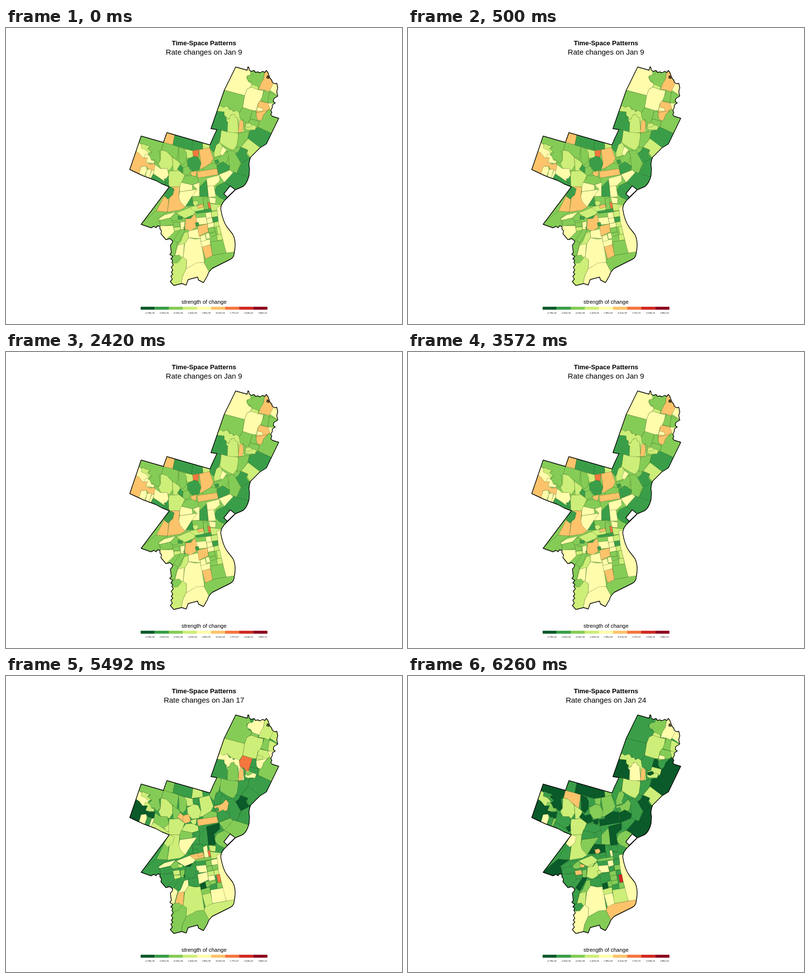
Recreate the animation shown at these times as an HTML page. Size 800 by 600 pixels, loop 8 s.

```html
<!DOCTYPE html>
<html lang="en">
<head>
<meta charset="utf-8">
<title>Time-Space Patterns</title>
<style>
html, body { margin: 0; width: 100%; height: 100%; overflow: hidden; background: #fff; }
svg { display: block; }
text { font-family: "Liberation Sans", Arial, sans-serif; text-anchor: middle; }
#areas path { stroke: #1c3a10; stroke-width: .3; }
.coast { fill: none; stroke: #000; stroke-width: 1.4; stroke-linejoin: round; }
</style>
</head>
<body>
<svg width="800" height="600" viewBox="0 0 800 600">
<clipPath id="clip"><path class="edge"/></clipPath>
<text x="400" y="35" font-size="13.2" font-weight="bold">Time-Space Patterns</text>
<text id="date" x="400" y="54" font-size="15"></text>
<!-- data-c: palette index of the area on each date -->
<g id="areas" clip-path="url(#clip)">
<path data-c="211" class="edge"/>
<!-- north east -->
<path data-c="421" d="M464 78L490 78 495 95 487 97 486 101 490 109 497 113 494 120 487 124 482 137 441 126z"/>
<path data-c="242" d="M492 95L498 94 503 86 523 88 520 104 516 113 513 119 508 120 498 115 494 108 490 107 487 103 488 98z"/>
<path data-c="323" d="M494 120L497 114 510 119 509 126z"/>
<path data-c="534" d="M523 88L530 85 533 101 541 113 534 125 530 130 522 126 510 124 515 112 520 104z"/>
<path data-c="434" d="M541 111L552 110 550 138 542 132 533 126z"/>
<path data-c="433" d="M487 124L495 120 509 125 520 127 517 145 509 153 506 167 499 168 478 161 482 137z"/>
<path data-c="222" d="M522 126L532 130 531 140 529 152 514 147 518 138z"/>
<path data-c="233" d="M532 130L541 134 550 140 540 155 529 151z"/>
<path data-c="443" d="M529 152L542 153 539 164 535 171 530 161z"/>
<path data-c="532" d="M512 148L529 152 533 163 528 168 505 172 509 155z"/>
<path data-c="541" d="M505 172L528 167 520 178 516 189 511 188 506 183z"/>
<path data-c="434" d="M508 160L519 163 518 169 506 168z"/>
<path data-c="220" d="M533 164L540 177 554 182 537 214 509 201 512 189 518 184 520 176z"/>
<path data-c="110" d="M509 201L537 214 526 238 513 243 488 224 492 209 500 207z"/>
<path data-c="231" d="M441 126L482 137 478 161 470 173 464 168 457 167 447 158 438 162 428 160z"/>
<path data-c="343" d="M426 168L432 157 438 161 447 158 452 166 457 165 459 170 465 167 472 172 474 183 480 190 481 211 470 213 469 186 464 181 460 175 455 176 452 183 444 186 440 171z"/>
<path data-c="110" d="M426 169L441 170 440 177 446 181 444 187 450 190 448 212 412 204z"/>
<path data-c="324" d="M448 191L444 186 451 184 453 178 460 174 464 181 468 182 470 212 447 213z"/>
<path data-c="555" d="M472 188L478 187 480 199 477 211 469 212z"/>
<path data-c="261" d="M478 161L498 167 493 184 490 193 484 192 480 186 473 185 471 173z"/>
<path data-c="210" d="M498 167L505 170 506 183 512 189 493 184z"/>
<path data-c="213" d="M493 184L512 189 509 201 497 197 490 193z"/>
<path data-c="343" d="M484 193L491 192 497 196 506 199 503 207 495 206 489 207 483 204z"/>
<path data-c="320" d="M484 195L494 193 497 198 489 202 484 200z"/>
<path data-c="323" d="M434 207L448 211 469 213 470 222 467 237 459 248 448 243 432 233z"/>
<path data-c="211" d="M470 213L492 209 488 224 479 236 474 242 466 242z"/>
<path data-c="313" d="M489 224L514 243 500 258 494 264 487 253 488 247 475 241 480 235z"/>
<path data-c="100" d="M474 242L489 248 485 254 489 261 496 264 476 273 467 270 459 258 470 250z"/>
<path data-c="110" d="M476 273L496 262 494 303 466 295z"/>
<path data-c="211" d="M446 250L460 248 474 273 466 295 452 288 450 263z"/>
<path data-c="120" d="M459 292L494 303 484 318 463 330 453 320 441 313z"/>
<path data-c="421" d="M430 297L453 288 459 293 441 313z"/>
<path data-c="122" d="M420 333L426 320 432 317 441 313 455 321 445 350 430 343z"/>
<path data-c="252" d="M420 264L433 261 445 250 450 258 447 272 437 276 424 275z"/>
<path data-c="110" d="M426 278L438 271 452 280 450 288 429 297z"/>
<path data-c="111" d="M421 269L428 266 431 273 424 275z"/>
<path data-c="121" d="M425 205L435 208 433 222 429 235 424 238 421 254 411 243 411 236 417 222z"/>
<path data-c="312" d="M425 237L432 232 437 240 434 258 421 262 420 253z"/>
<path data-c="411" d="M437 240L446 247 437 259 432 255z"/>
<!-- north row -->
<path data-c="521" d="M325 210L341 217 337 237 316 232z"/>
<path data-c="110" d="M341 217L378 225 375 248 337 237z"/>
<path data-c="130" d="M378 225L397 234 398 245 375 248z"/>
<path data-c="312" d="M397 233L412 236 411 243 398 246z"/>
<path data-c="532" d="M390 247L411 242 419 264 414 274 398 284 387 287 394 273z"/>
<path data-c="331" d="M360 245L378 249 379 262 366 264z"/>
<path data-c="612" d="M377 249L390 247 388 262 378 259z"/>
<path data-c="132" d="M366 267L379 260 388 262 394 275 390 288 376 290 367 280z"/>
<path data-c="225" d="M318 232L337 237 349 241 345 269 336 261 323 250 314 247z"/>
<path data-c="220" d="M349 241L361 246 365 254 364 270 357 278 350 272z"/>
<!-- north west -->
<path data-c="220" d="M273 218L318 232 314 247 309 250 312 268 305 274 299 267 292 268 289 257 295 252 285 246 292 241 284 238 268 233z"/>
<path data-c="443" d="M268 232L275 237 279 235 291 250 287 256 292 268 301 275 284 274 275 264 258 264z"/>
<path data-c="331" d="M275 234L284 238 291 239 285 245 293 250 288 254 282 247 273 243z"/>
<path data-c="432" d="M282 255L290 259 294 268 300 269 298 275 286 272 279 263z"/>
<path data-c="500" d="M263 250L269 254 276 263 286 263 282 272 291 276 301 275 302 288 291 290 283 280 273 281 269 299 248 288z"/>
<path data-c="333" d="M313 247L324 250 336 262 337 278 330 289 323 285 313 285 308 275 312 268z"/>
<path data-c="323" d="M336 262L346 269 352 274 349 289 338 290z"/>
<path data-c="444" d="M273 281L283 280 285 288 279 303 268 298z"/>
<path data-c="411" d="M285 287L294 286 290 304 281 303z"/>
<path data-c="442" d="M294 289L301 288 293 305 289 305z"/>
<path data-c="421" d="M301 277L312 285 326 285 329 300 319 311 298 296z"/>
<path data-c="131" d="M291 307L298 296 309 303 316 308 332 318 330 326z"/>
<path data-c="333" d="M330 290L338 290 349 289 361 298 355 314 351 322 330 322 327 309z"/>
<path data-c="130" d="M319 306L324 305 328 299 329 314 324 316z"/>
<!-- middle -->
<path data-c="150" d="M346 286L352 277 360 285 358 295z"/>
<path data-c="250" d="M358 283L369 280 373 291 371 296 362 299 357 294z"/>
<path data-c="530" d="M372 293L385 289 384 300 378 302z"/>
<path data-c="220" d="M398 284L414 274 426 276 426 286 398 290z"/>
<path data-c="550" d="M386 291L426 285 429 297 388 304z"/>
<path data-c="231" d="M363 300L376 299 388 304 389 314 375 318 354 313z"/>
<path data-c="421" d="M354 313L376 318 377 328 351 332 351 322z"/>
<path data-c="442" d="M351 332L386 327 376 342 366 362 345 360z"/>
<path data-c="533" d="M334 322L351 322 349 342 352 352 362 363 352 369 326 373 330 345z"/>
<path data-c="521" d="M303 373L319 341 329 345 326 373z"/>
<path data-c="134" d="M330 321L340 326 337 338 327 347 319 340z"/>
<path data-c="411" d="M377 318L391 313 391 341 375 342 386 327z"/>
<path data-c="112" d="M391 322L405 308 409 342 391 341z"/>
<path data-c="400" d="M405 305L431 298 432 310 421 320 407 321z"/>
<path data-c="400" d="M407 321L420 319 424 342 409 343z"/>
<path data-c="110" d="M375 342L379 360 363 361z"/>
<path data-c="210" d="M376 341L398 342 399 358 379 360z"/>
<path data-c="315" d="M377 352L386 350 389 356 383 361 379 359z"/>
<path data-c="351" d="M369 364L388 359 401 363 399 370 380 373z"/>
<path data-c="551" d="M386 360L398 357 399 363 388 366z"/>
<path data-c="241" d="M398 347L406 343 410 368 401 368z"/>
<path data-c="431" d="M410 343L424 345 423 356 412 355z"/>
<path data-c="331" d="M412 356L437 359 434 368 415 371z"/>
<path data-c="664" d="M407 354L412 353 414 365 410 367z"/>
<path data-c="122" d="M381 372L414 366 416 372 385 376z"/>
<!-- south west -->
<path data-c="210" d="M271 398L303 371 326 373 308 385 313 404 292 408z"/>
<path data-c="441" d="M308 387L320 379 343 373 332 385 311 390z"/>
<path data-c="211" d="M311 390L332 385 340 398 312 402z"/>
<path data-c="411" d="M310 401L338 401 340 413 333 420 322 430 310 417z"/>
<path data-c="222" d="M332 385L343 375 350 381 347 390 336 391z"/>
<path data-c="343" d="M344 375L371 364 383 373 374 383 362 386 352 380z"/>
<path data-c="103" d="M361 386L377 379 372 387z"/>
<path data-c="135" d="M347 381L357 383 356 388 348 388z"/>
<path data-c="235" d="M337 395L350 393 352 402 339 404z"/>
<path data-c="331" d="M339 404L352 403 353 409 340 412z"/>
<path data-c="422" d="M352 394L361 392 360 408 353 409z"/>
<path data-c="102" d="M358 405L363 401 362 409z"/>
<path data-c="513" d="M363 387L374 386 381 377 386 388 384 404 373 412 361 407z"/>
<path data-c="210" d="M338 430L347 417 353 408 362 409 356 421 347 436z"/>
<path data-c="241" d="M330 440L338 429 347 436 340 462 329 462z"/>
<path data-c="342" d="M360 415L368 413 369 425 361 438 346 440 353 433z"/>
<path data-c="453" d="M341 463L347 440 360 437 358 466z"/>
<path data-c="324" d="M336 475L347 473 356 463 365 470 364 488 357 503 353 523 328 523z"/>
<path data-c="221" d="M336 462L350 460 355 466 347 476 335 477z"/>
<!-- south -->
<path data-c="411" d="M368 412L388 407 393 427 369 425z"/>
<path data-c="434" d="M361 438L369 425 382 428 393 427 396 443 401 475 385 477 364 488 365 470 358 465z"/>
<path data-c="422" d="M364 488L385 476 400 475 411 495 400 520 353 523 357 503z"/>
<path data-c="235" d="M400 475L403 467 417 461 466 452 462 470 411 496z"/>
<path data-c="534" d="M396 443L413 439 418 461 403 468z"/>
<path data-c="243" d="M413 434L440 429 445 456 417 461z"/>
<path data-c="444" d="M426 363L437 361 467 425 466 453 445 456 438 429 428 392z"/>
<path data-c="423" d="M393 432L412 428 413 439 396 444z"/>
<path data-c="400" d="M392 422L402 418 405 430 394 433z"/>
<path data-c="444" d="M384 385L404 383 407 397 387 399z"/>
<path data-c="113" d="M382 395L389 394 390 401 384 402z"/>
<path data-c="541" d="M387 402L407 397 409 413 390 422z"/>
<path data-c="424" d="M403 375L414 373 416 384 405 387z"/>
<path data-c="341" d="M414 373L427 370 428 382 416 384z"/>
<path data-c="122" d="M416 384L428 382 429 392 418 394z"/>
<path data-c="421" d="M405 387L416 384 418 394 407 397z"/>
<path data-c="432" d="M407 397L420 394 421 403 408 406z"/>
<path data-c="331" d="M420 394L429 392 431 402 421 404z"/>
<path data-c="242" d="M408 406L421 403 423 413 410 416z"/>
<path data-c="222" d="M410 416L423 413 425 420 412 424z"/>
<path data-c="422" d="M403 417L410 415 413 426 405 428z"/>
<path data-c="367" d="M425 403L432 402 435 418 428 419z"/>
<path data-c="322" d="M426 419L435 418 438 429 427 431z"/>
</g>
<path class="edge coast"/>
<path class="coast" d="M453 320L463 328 447 343 440 336z" style="fill:#fff"/>
<path class="coast" d="M462 329L445 346M527 97l3 1 1 4-4-1 1-4" stroke-width="2"/>
<text x="400" y="559" font-size="11">strength of change</text>
<g id="legend"></g>
</svg>
<script>
const palette = ["#0a5a2a", "#3a9e49", "#85cc57", "#cdee78", "#fffcab", "#fdc36b", "#f4763f", "#d12b23", "#8c0420"];
const labels = ["-4.780e-02", "-5.395e-06", "-6.041e-09", "-1.429e-09", "1.985e-09",
  "8.555e-09", "1.797e-07", "5.038e-02", "2.882e-01"];
const steps = [[0, "Jan 9"], [4340, "Jan 17"], [6260, "Jan 24"]];

const east = `M464 79L487 85.500 489 78.500 491 81 491 85 496 88 501 86 504 90 509 89 513 91 518 88 523 90
  526 86 529 90 533 101 537 106 538 110 543 113 547 112 549 121 547 129 549 138 541 143 540 149 544 152
  538 156 538 161 535 167 537 171 535 176 538 179 551 183 526 235 513 243 500 256 494 262
  Q489 277 492 284L491 299Q486 319 475 323L463 328 445 346Q433 357 434 368Q438 392 447 404L458 418
  Q466 433 461 456Q461 465 453 469L417 487Q409 494 407 502L399 516`;
const west = `L389 511 387 505 368 510 364 521 355 518 339 522 332 514 336 509 333 503 337 499 334 495 337 491
  334 485 338 480 335 475 337 471 333 468 337 463 331 459 334 455 332 440 335 437 337 432 331 427 323 429
  313 417 314 411 311 407 311 402 306 401 303 405 299 402 293 405 273 398 330 322 315 316 302 309 278 300
  250 287 273 219 318 232 325 212 412 237 418 223 426 206 414 204 432 152 441 126z`;
for (const p of document.querySelectorAll(".edge")) p.setAttribute("d", east + west);

const cell = 256 / 9;
document.getElementById("legend").innerHTML = labels.map((s, i) =>
  `<rect x="${272 + i * cell}" y="565" width="${cell + .1}" height="6" fill="${palette[i]}"/>
   <text x="${290.5 + i * 28.5}" y="579" font-size="4">${s}</text>`).join("");

const areas = document.querySelectorAll("#areas path");
const date = document.getElementById("date");
let shown = -1;

function show(n) {
  shown = n;
  date.textContent = "Rate changes on " + steps[n][1];
  for (const a of areas) a.setAttribute("fill", palette[a.dataset.c[n]]);
}

const start = performance.now();
function frame() {
  const t = (performance.now() - start) % 8000;
  const n = steps.filter(s => t >= s[0]).length - 1;
  if (n !== shown) show(n);
  requestAnimationFrame(frame);
}
frame();
</script>
</body>
</html>
```
